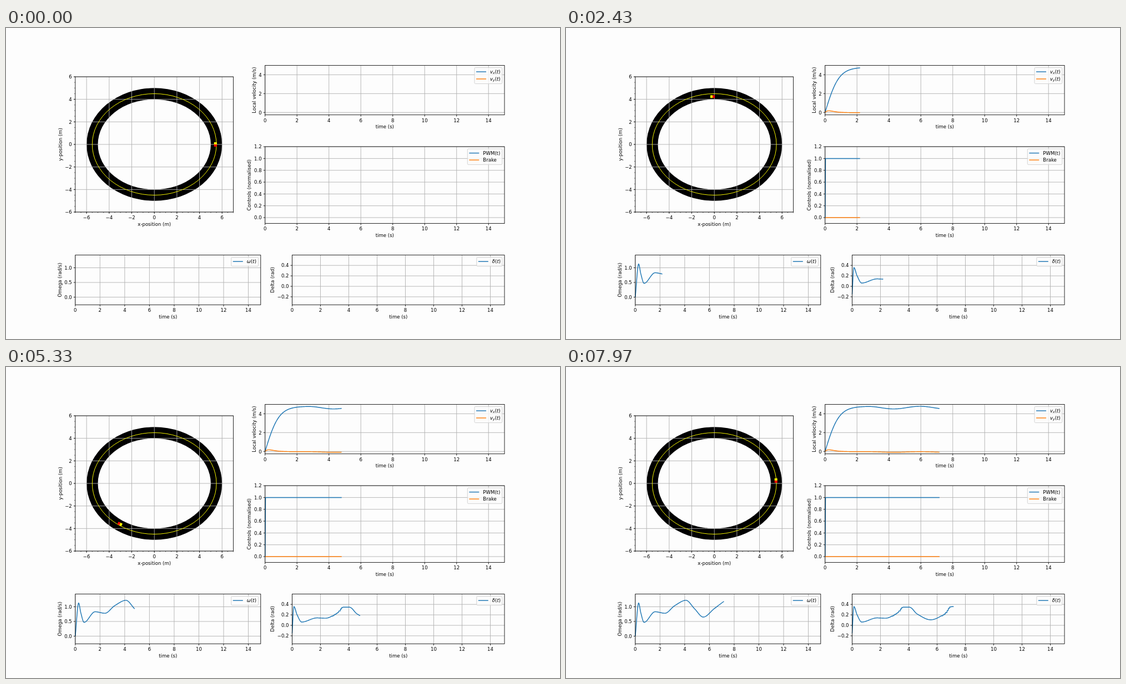
Animation, 998 px wide and 561 px high, one loop 8000 ms. Source, as an HTML page:

```html
<!DOCTYPE html>
<html lang="en">
<head>
<meta charset="utf-8">
<title>Lap telemetry</title>
<style>
  html, body { margin: 0; width: 100%; height: 100%; overflow: hidden; background: #fdfdfd; }
  svg { display: block; width: 100%; height: 100%; }
  text { font: 8.55px "DejaVu Sans", sans-serif; }
  .mid { text-anchor: middle; }
  .end { text-anchor: end; }
  .math { font-style: italic; }
  .up { font-style: normal; }
  .sub { font-size: 6px; }
  .grid { stroke: #b0b0b0; stroke-width: .9; }
  .axis { stroke: #000; stroke-width: .85; fill: none; }
  .minor { stroke: #000; stroke-width: .55; }
  .data { fill: none; stroke-width: 1.45; stroke-linejoin: round; }
  .legend { fill: #fdfdfd; fill-opacity: .8; stroke: #ccc; stroke-width: .85; }
</style>
</head>
<body>
<svg id="stage" viewBox="0 0 998 561"></svg>
<script>
const BLUE = '#1f77b4', ORANGE = '#ff7f0e';
const LOOP = 8000, FRAMES = 240, STEP = 0.03;
const { PI, sin, cos, tanh, exp, hypot, floor, max } = Math;
const stage = document.getElementById('stage');

function add(tag, attrs, html) {
  const el = document.createElementNS('http://www.w3.org/2000/svg', tag);
  for (const key in attrs) el.setAttribute(key, attrs[key]);
  if (html) el.innerHTML = html;
  return stage.appendChild(el);
}
const line = (cls, x1, y1, x2, y2) => add('line', { class: cls, x1, y1, x2, y2 });
const text = (cls, x, y, html) => add('text', { class: cls, x, y }, html);
const range = (from, to, step) =>
  Array.from({ length: Math.round((to - from) / step) + 1 }, (_, i) => from + i * step);

// Monotone cubic through a few [time, value] knots
function curve(...knots) {
  const last = knots.length - 1;
  const secant = i => (knots[i + 1][1] - knots[i][1]) / (knots[i + 1][0] - knots[i][0]);
  const slopes = knots.map((_, i) => {
    if (i === 0 || i === last) return secant(i ? i - 1 : 0);
    const a = secant(i - 1), b = secant(i);
    return a * b <= 0 ? 0 : 2 * a * b / (a + b);
  });
  return t => {
    let i = 0;
    while (i < last - 1 && t > knots[i + 1][0]) i++;
    const [t0, v0] = knots[i], [t1, v1] = knots[i + 1];
    const h = t1 - t0, u = (t - t0) / h, w = 1 - u;
    return (v0 * (1 + 2 * u) + slopes[i] * h * u) * w * w
         + (v1 * (3 - 2 * u) - slopes[i + 1] * h * w) * u * u;
  };
}

// The speed settles, then swings once per half lap
const settle = t => tanh(1.15 * t);
const swing = t => cos(2 * PI * max(0, t - 2.65) / 3.3);
const vx = t => settle(t) * (4.65 + .14 * swing(t));
const vy = t => .72 * t * exp(1 - 4 * t) - settle(t) * (.06 - .03 * swing(t));

// Steering and yaw rate: turning points plus a few midpoints
const omega = curve([0, 0], [.27, 1.13], [.45, .79], [.71, .47], [1.6, .83], [2.4, .78],
  [3.2, 1.04], [4.1, 1.22], [4.8, .93], [5.5, .65], [6.4, .94], [7.3, 1.225]);
const steering = curve([0, -.15], [.12, .36], [.35, .2], [.67, .063], [1.75, .142], [2.35, .136],
  [3.2, .245], [3.55, .346], [4.05, .346], [4.6, .215], [5.55, .106], [6.5, .215], [6.95, .357], [7.2, .357]);
// Sharp left turns are commanded in coarse time steps
const held = t => floor(t / .1 + 1e-6) * .1;
const delta = t => steering(t > 1 && steering(t) > steering(t - .1) && steering(t) > .18 ? held(t) : t);

// Drive round the centre line, cutting inside on the flatter sides
const inset = (a, t) => .9725 + .022 * cos(2 * (a - 3.3)) - .05 * exp(-(((t - 1.1) / .85) ** 2));
const poses = [];
for (let n = 0, angle = 0, heading = PI / 2; n < FRAMES; n++) {
  const t = n * STEP, mid = t + STEP / 2, r = inset(angle, t);
  poses.push({ x: 5.5 * r * cos(angle), y: 4.5 * r * sin(angle), heading });
  angle += .99 * vx(mid) * STEP / (r * hypot(5.5 * sin(angle), 4.5 * cos(angle)));
  heading += omega(mid) * STEP;
}

const label = (v, digits) => v.toFixed(digits).replace(/^-(?=0\.?0*$)/, '').replace('-', '\u2212');

function axes({ box: [left, top, right, bottom], X, Y, xTicks, yTicks, digits = 0,
                xName = 'time (s)', yName, yNameX }) {
  for (const v of xTicks) line('grid', X(v), top, X(v), bottom);
  for (const v of yTicks) line('grid', left, Y(v), right, Y(v));
  for (const v of xTicks) {
    line('axis', X(v), bottom, X(v), bottom + 3);
    text('mid', X(v), bottom + 12.8, label(v, 0));
  }
  for (const v of yTicks) {
    line('axis', left - 3, Y(v), left, Y(v));
    text('end', left - 6, Y(v) + 3.2, label(v, digits));
  }
  text('mid', (left + right) / 2, bottom + 24.5, xName);
  add('text', { class: 'mid', transform: `translate(${yNameX} ${(top + bottom) / 2}) rotate(-90)` }, yName);
}
const frame = ([left, top, right, bottom]) =>
  add('rect', { class: 'axis', x: left, y: top, width: right - left, height: bottom - top });

const traces = [];
function timePlot({ box, zero, unit, series, legendX, rowGap = 12.9, textClass = 'math', ...rest }) {
  const [left, top, right] = box;
  const X = t => left + t * (right - left) / 15, Y = v => zero - v * unit;
  axes({ box, X, Y, xTicks: range(0, 14, 2), ...rest });
  for (const { f, color } of series) {
    const points = range(0, FRAMES - 1, 1).map(n =>
      X(n * STEP).toFixed(2) + ' ' + Y(f(n * STEP)).toFixed(2));
    traces.push({ points, el: add('path', { class: 'data', stroke: color }) });
  }
  frame(box);
  add('rect', { class: 'legend', x: legendX, y: top + 4, rx: 1.7,
    width: right - 4.2 - legendX, height: 3.3 + rowGap * series.length });
  series.forEach(({ name, color }, i) => {
    const y = top + 11.6 + i * rowGap;
    add('path', { class: 'data', stroke: color, d: `M${legendX + 3} ${y}h18` });
    text(textClass, legendX + 28, y + 3, name);
  });
}

// Track
const track = { box: [124.8, 88, 409.6, 332], X: x => 267.2 + x * 20.34, Y: y => 210 - y * 20.34 };
const ellipse = (rx, ry, attrs) =>
  add('ellipse', { cx: 267.2, cy: 210, rx: rx * 20.34, ry: ry * 20.34, ...attrs });
ellipse(6, 5, { fill: '#000' });
ellipse(5, 4, { fill: '#fdfdfd' });
axes({ ...track, xTicks: range(-6, 6, 2), yTicks: range(-6, 6, 2),
  xName: 'x-position (m)', yName: 'y-position (m)', yNameX: 101.2 });
for (const v of range(-7, 7, .5)) line('minor', track.X(v), 332, track.X(v), 333.8);
for (const v of range(-6, 6, .5)) line('minor', 123, track.Y(v), 124.8, track.Y(v));
ellipse(5.5, 4.5, { fill: 'none', stroke: '#ff0', 'stroke-width': .95 });
const car = add('g', {}, '<path fill="#f00" d="M-4-2.5h4v5h-4z"/><path fill="#ff0" d="M0-2.5h4v5h-4z"/>');
frame(track.box);

// Time plots
const ofT = '<tspan class="up">(</tspan>t<tspan class="up">)</tspan>';
const velocity = axis => `v<tspan class="sub" dy="1.4">${axis}</tspan><tspan dy="-1.4" class="up">(</tspan>t<tspan class="up">)</tspan>`;
timePlot({ box: [466.7, 67.4, 898, 156.7], zero: 152.3, unit: 17, yTicks: [0, 2, 4],
  yName: 'Local velocity (m/s)', yNameX: 449.7, legendX: 844,
  series: [{ f: vx, color: BLUE, name: velocity('x') }, { f: vy, color: ORANGE, name: velocity('y') }] });
timePlot({ box: [466.7, 214, 898, 352.6], zero: 342, unit: 106.6, yTicks: range(0, 1.2, .2), digits: 1,
  yName: 'Controls (normalised)', yNameX: 441.3, legendX: 831.3, rowGap: 12.5, textClass: '',
  series: [{ f: t => t > 0 ? 1 : 0, color: BLUE, name: 'PWM(t)' },
           { f: () => 0, color: ORANGE, name: 'Brake' }] });
timePlot({ box: [124.8, 409.6, 458.8, 499.3], zero: 485.5, unit: 53, yTicks: [0, .5, 1], digits: 1,
  yName: 'Omega (rad/s)', yNameX: 99.8, legendX: 405.8,
  series: [{ f: omega, color: BLUE, name: 'ω' + ofT }] });
timePlot({ box: [515.5, 409.6, 898, 499.3], zero: 466, unit: 94.5, yTicks: range(-.2, .4, .2), digits: 1,
  yName: 'Delta (rad)', yNameX: 483.4, legendX: 847.8,
  series: [{ f: delta, color: BLUE, name: 'δ' + ofT }] });

function draw(now) {
  const n = floor((now % LOOP + 4) * FRAMES / LOOP) % FRAMES;
  for (const { el, points } of traces)
    el.setAttribute('d', n ? 'M' + points.slice(0, n + 1).join('L') : '');
  const { x, y, heading } = poses[n];
  car.setAttribute('transform',
    `translate(${track.X(x)} ${track.Y(y)}) rotate(${-heading * 180 / PI})`);
}
function tick() {
  draw(performance.now());
  requestAnimationFrame(tick);
}
tick();
</script>
</body>
</html>
```
